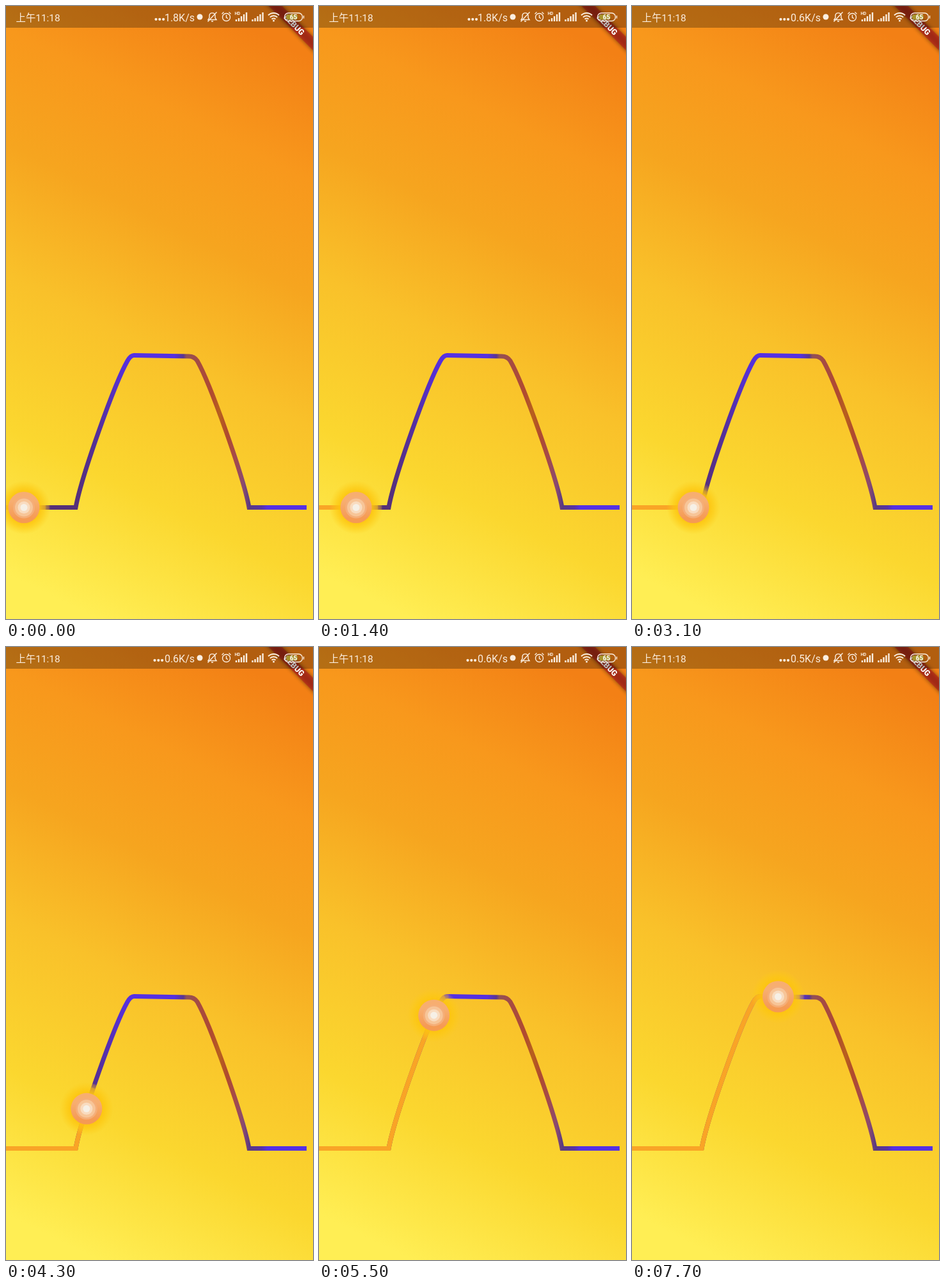
Recreate the animation shown at these times as an HTML page without scripts. Size 480 by 959 pixels, loop 7.8 s.

```html
<!DOCTYPE html>
<html lang="zh">
<head>
<meta charset="utf-8">
<title>Glowing ball on a track</title>
<style>
@property --d { syntax: "<length>"; inherits: true; initial-value: 28px; }
html, body { margin: 0; width: 100%; height: 100%; overflow: hidden; }
svg { display: block; width: 480px; height: 959px; animation: travel 7.8s linear infinite; }
text { font-family: Roboto, "Noto Sans CJK SC", "Noto Sans CJK", sans-serif; }

/* --d is the distance covered along the track */
@keyframes travel {
  0% { --d: 28px; }
  17.95% { --d: 58px; }
  39.74% { --d: 96px; }
  46.79% { --d: 109px; }
  55.13% { --d: 173.5px; }
  61.54% { --d: 233.5px; }
  70.51% { --d: 329px; }
  75% { --d: 358px; }
  77.56% { --d: 359px; }
  83.33% { --d: 373px; }
  98.72%, 100% { --d: 395px; }
}
.track { fill: none; stroke-width: 7; }
.done {
  stroke: #f9a426;
  stroke-dasharray: 1000px;
  stroke-dashoffset: calc(1000px - var(--d) - var(--lead));
}
.ball {
  offset-path: path("M0 784.5H109C118 735 170 590 190 555Q195 546.5 200 546.5L286 548Q294 548 299 555C319 590 371 735 380 784.5H470");
  offset-distance: var(--d);
  offset-rotate: 0deg;
}
.speed { opacity: 0; animation: 7.8s step-end infinite; }
.s1 { animation-name: first; }
.s2 { animation-name: second; }
.s3 { animation-name: third; }
@keyframes first { 0% { opacity: 1; } 25.64% { opacity: 0; } }
@keyframes second { 0% { opacity: 0; } 25.64% { opacity: 1; } 74.36% { opacity: 0; } }
@keyframes third { 0% { opacity: 0; } 74.36% { opacity: 1; } }
</style>
</head>
<body>
<svg viewBox="0 0 480 959">
  <defs>
    <linearGradient id="sky" gradientUnits="userSpaceOnUse" x1="480" y1="0" x2="0" y2="959">
      <stop offset=".07" stop-color="#f38015"/>
      <stop offset=".23" stop-color="#f8981c"/>
      <stop offset=".38" stop-color="#f6a51f"/>
      <stop offset=".55" stop-color="#f9c12a"/>
      <stop offset=".75" stop-color="#fbd72f"/>
      <stop offset=".94" stop-color="#ffee54"/>
    </linearGradient>
    <linearGradient id="ink" gradientUnits="userSpaceOnUse" x1="0" y1="0" x2="470" y2="0">
      <stop offset=".23" stop-color="#553078"/>
      <stop offset=".31" stop-color="#55309c"/>
      <stop offset=".38" stop-color="#5630d0"/>
      <stop offset=".42" stop-color="#5530e4"/>
      <stop offset=".56" stop-color="#5530e0"/>
      <stop offset=".59" stop-color="#5a3590"/>
      <stop offset=".6" stop-color="#905058"/>
      <stop offset=".64" stop-color="#a64a42"/>
      <stop offset=".685" stop-color="#b04a30"/>
      <stop offset=".71" stop-color="#b8601c"/>
      <stop offset=".735" stop-color="#b04a2e"/>
      <stop offset=".76" stop-color="#a64a48"/>
      <stop offset=".79" stop-color="#8a4a70"/>
      <stop offset=".81" stop-color="#5a3a80"/>
      <stop offset=".85" stop-color="#5732a8"/>
      <stop offset=".87" stop-color="#5530e4"/>
    </linearGradient>
    <radialGradient id="glow">
      <stop offset=".58" stop-color="#fdc40e" stop-opacity=".9"/>
      <stop offset=".75" stop-color="#fdc810" stop-opacity=".6"/>
      <stop offset="1" stop-color="#fdcc18" stop-opacity="0"/>
    </radialGradient>
    <linearGradient id="skin" x2="0" y2="1">
      <stop offset=".3" stop-color="#f7ae70"/>
      <stop offset=".85" stop-color="#f59a54"/>
    </linearGradient>
    <path id="route" d="M0 784.5H109C118 735 170 590 190 555Q195 546.5 200 546.5L286 548Q294 548 299 555C319 590 371 735 380 784.5H470"/>
    <path id="bars" d="M0 24v-3M4 24v-5M8 24v-8M12 24v-11M16 24v-14"/>
    <g id="dots"><circle r="2.1"/><circle cx="5.8" r="2.1"/><circle cx="11.6" r="2.1"/></g>
  </defs>

  <rect width="480" height="959" fill="url(#sky)"/>

  <use class="track" href="#route" stroke="url(#ink)"/>
  <use class="track done" href="#route" style="--lead: 40px" opacity=".2"/>
  <use class="track done" href="#route" style="--lead: 34px" opacity=".45"/>
  <use class="track done" href="#route" style="--lead: 22px"/>

  <g class="ball">
    <circle r="42" fill="url(#glow)"/>
    <circle r="24.5" fill="url(#skin)"/>
    <circle r="17" fill="#f5ae78"/>
    <circle r="14" fill="#f7c598"/>
    <circle r="9.5" fill="#f9dcc0"/>
    <circle r="5.5" fill="#f6f0e6"/>
  </g>

  <g transform="translate(480) rotate(45)">
    <rect x="-60" y="34.2" width="120" height="14.7" opacity=".5" style="filter: blur(3px)"/>
    <rect x="-60" y="34.2" width="120" height="14.7" fill="#b71c1c" fill-opacity=".63"/>
    <text y="46" font-size="12.4" font-weight="900" text-anchor="middle" fill="#fff">DEBUG</text>
  </g>

  <rect width="480" height="34" fill-opacity=".27"/>
  <g fill="#fbeee0" font-size="16">
    <text x="15.5" y="23.5" font-size="15.4">上午11:18</text>
    <g class="speed s1"><use href="#dots" x="234.5" y="20.8"/><text x="295" y="23.5" text-anchor="end">1.8K/s</text></g>
    <g class="speed s2"><use href="#dots" x="232.5" y="20.8"/><text x="295" y="23.5" text-anchor="end">0.6K/s</text></g>
    <g class="speed s3"><use href="#dots" x="232.5" y="20.8"/><text x="295" y="23.5" text-anchor="end">0.5K/s</text></g>
    <circle cx="303" cy="17" r="4.5"/>
    <text x="357.5" y="14" font-size="6.5" font-weight="700">HD</text>
  </g>
  <g fill="none" stroke="#fbeee0" stroke-width="1.4">
    <path d="M316 21.5h13l-2-3v-4a4.6 4.6 0 0 0-9 0v4zM321 24h3M329.5 9.5l-14 15"/>
    <circle cx="344.5" cy="17.5" r="6"/>
    <path d="M344.5 14v4l2.5 1.5M337.5 12.5l3-3M351.5 12.5l-3-3"/>
    <use href="#bars" x="360" stroke-width="2.4"/>
    <use href="#bars" x="385.5" stroke-width="2.4"/>
    <path d="M410 14.5a12 12 0 0 1 17 0M412.8 17.7a8 8 0 0 1 11.4 0M415.5 20.6a4.3 4.3 0 0 1 6 0" stroke-width="1.9"/>
    <circle cx="418.5" cy="23" r=".8"/>
    <rect x="435.5" y="11" width="28" height="12.5" rx="6"/>
  </g>
  <rect x="438" y="13" width="18" height="8.5" rx="4" fill="#a8942c"/>
  <path d="M465.5 15v4.5" stroke="#fbeee0" stroke-width="1.4"/>
  <text x="449.5" y="21" font-size="10" font-weight="700" text-anchor="middle" fill="#fff">65</text>
</svg>
</body>
</html>
```
